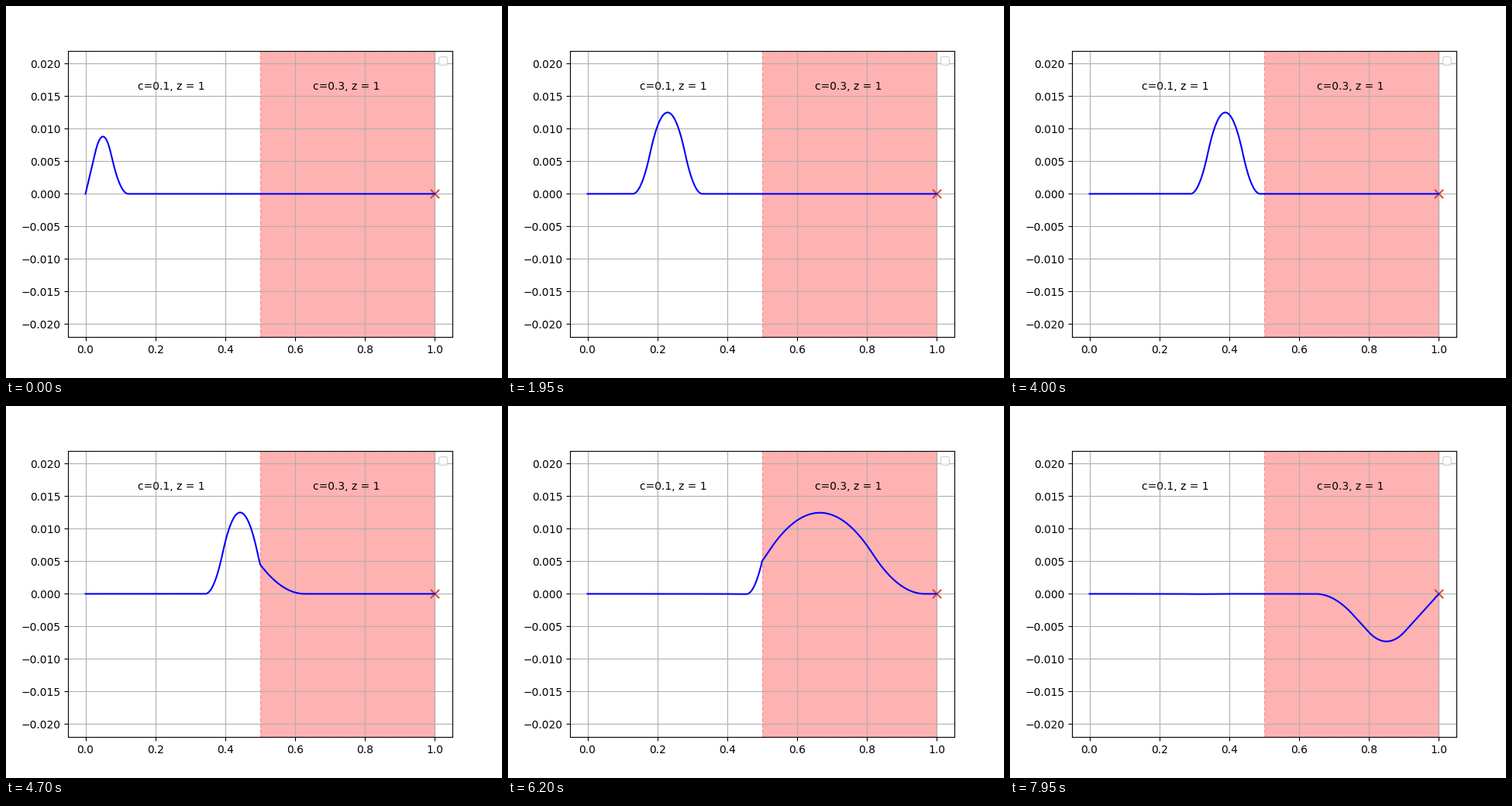
A matplotlib script for the animation above (8000 ms loop, 640 by 480 pixels).

```python
import numpy as np
import matplotlib.pyplot as plt
from matplotlib.animation import FuncAnimation

FRAMES, INTERVAL = 160, 50
C1, C2 = 0.1, 0.3
JOIN = 0.5
WALL = JOIN + (1 - JOIN) * C1 / C2  # right end, in left-medium distance
R = -0.003                          # faint echo from the join

# Distance covered by the pulse centre: quick at first, then nearly steady
KEY_N = np.array([0, 17, 34, 51, 68, 94, 124, 159])
KEY_S = np.array([0.0228, 0.131, 0.209, 0.275, 0.342, 0.4425, 0.555, 0.6845])
SLOPE = np.gradient(KEY_S, KEY_N)
SLOPE[0] = 0.0073


def travel(n):
    """Cubic Hermite interpolation of the pulse position."""
    i = min(np.searchsorted(KEY_N, n, side="right") - 1, len(KEY_N) - 2)
    h = KEY_N[i + 1] - KEY_N[i]
    t = (n - KEY_N[i]) / h
    return ((1 + 2 * t) * (1 - t) ** 2 * KEY_S[i]
            + t * (1 - t) ** 2 * h * SLOPE[i]
            + t * t * (3 - 2 * t) * KEY_S[i + 1]
            + t * t * (t - 1) * h * SLOPE[i + 1])


def bump(d):
    """Smooth hill made of parabolas, 0.2 wide and 0.0125 high."""
    d = np.abs(d)
    return np.where(d < 0.05, 0.0125 - 2.5 * d ** 2,
                    2.5 * np.clip(0.1 - d, 0, None) ** 2)


x = np.linspace(0, 1, 1001)
left = x <= JOIN
q = np.where(left, x, JOIN + (x - JOIN) * C1 / C2)


def wave(n):
    s = travel(n)
    direct = bump(q - s) - bump(q + s)
    echo = R * bump(q - (2 * JOIN - s))
    passed = (1 + R) * (bump(q - s) - bump(q - (2 * WALL - s)))
    return np.where(left, direct + echo, passed)


fig, ax = plt.subplots(figsize=(6.4, 4.8), dpi=100)
ax.set_xlim(-0.05, 1.05)
ax.set_ylim(-0.022, 0.022)
ax.grid(True)
ax.axvspan(JOIN, 1, color="red", alpha=0.3, linestyle="--")
ax.scatter([1], [0], s=64, marker="x", color="#dc4632", zorder=1.2)
ax.text(0.15, 0.016, f"c={C1}, z = 1")
ax.text(0.65, 0.016, f"c={C2}, z = 1")
ax.legend(handles=[], loc="upper right")
line, = ax.plot(x, wave(0), color="blue", lw=1.5)


def update(n):
    line.set_ydata(wave(n))
    return line,


anim = FuncAnimation(fig, update, frames=FRAMES, interval=INTERVAL,
                     repeat=True, repeat_delay=0)
plt.show()
```
